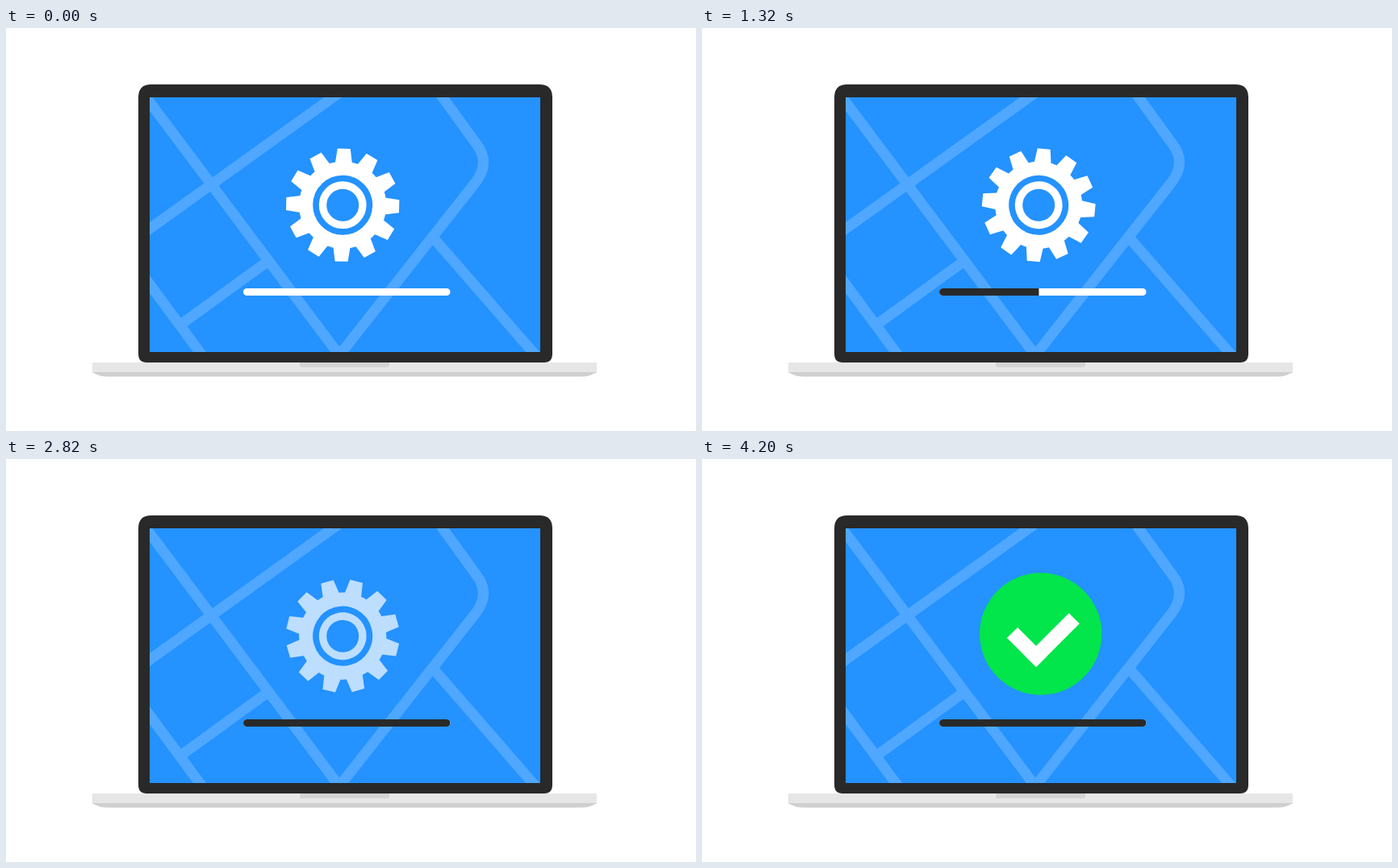
Animation of 855 by 500 pixels, one loop 4.35 s. Source, as an HTML page:

```html
<!DOCTYPE html>
<html lang="en">
<head>
<meta charset="utf-8">
<title>Laptop update</title>
<style>
  html, body { margin: 0; width: 100%; height: 100%; overflow: hidden; background: #fff; }
  svg { display: block; width: 855px; height: 500px; }
</style>
</head>
<body>
<svg viewBox="0 0 855 500">
  <defs>
    <clipPath id="screen"><rect x="178" y="86" width="484" height="316"/></clipPath>
    <clipPath id="track"><rect x="294" y="323" width="256.5" height="9" rx="4.5"/></clipPath>
    <path id="tooth" d="M-10.5-52 L-8-70 H8 L10.5-52Z"/>
  </defs>

  <path fill="#292929" d="M180 70H661Q677 70 677 86V404Q677 415 667 415H174Q164 415 164 404V86Q164 70 180 70Z"/>
  <g clip-path="url(#screen)">
    <rect x="178" y="86" width="484" height="316" fill="#2492ff"/>
    <g fill="none" stroke="#4fa7ff" stroke-width="13">
      <path d="M168 78.6L413 406"/>
      <path d="M168 256.2L415 78.8"/>
      <path d="M219 366L321 292"/>
      <path d="M168 304.5L250 415.6"/>
      <path d="M534 76.3L583 144Q600 166 583 190L413 406"/>
      <path d="M531 262L664 415"/>
    </g>
  </g>

  <path fill="#e6e6e6" d="M107 415H732V428H107Z"/>
  <path fill="#cfcfcf" d="M107 427H732Q724 432.5 712 432.5H127Q115 432.5 107 427Z"/>
  <path fill="#d4d4d4" d="M364 415H475V418Q475 421 472 421H367Q364 421 364 418Z"/>

  <g clip-path="url(#track)">
    <rect x="294" y="323" width="257" height="9" fill="#fff"/>
    <rect id="bar" x="294" y="323" width="0" height="9" fill="#292929"/>
  </g>

  <g id="gear">
    <g id="teeth" fill="#fff"></g>
    <g fill="none" stroke="#fff">
      <circle r="45.5" stroke-width="17"/>
      <circle r="24.7" stroke-width="9.4"/>
    </g>
  </g>

  <circle id="disc" cx="419.7" cy="217" r="0" fill="#02e54b"/>
  <g stroke="#fff" stroke-width="18.5">
    <line id="short" x1="384.5" y1="215.5"/>
    <line id="long" x1="407.5" y1="251.5"/>
  </g>
</svg>
<script>
  const LOOP = 4350, STEP = 30;
  const $ = id => document.getElementById(id);
  const [bar, gear, disc, short, long] = ['bar', 'gear', 'disc', 'short', 'long'].map($);

  for (let i = 0; i < 12; i++) {
    const tooth = document.createElementNS('http://www.w3.org/2000/svg', 'use');
    tooth.setAttribute('href', '#tooth');
    tooth.setAttribute('transform', `rotate(${i * 30})`);
    $('teeth').append(tooth);
  }

  const set = (el, attrs) => {
    for (const key in attrs) el.setAttribute(key, attrs[key]);
  };
  const ramp = (t, from, to) => Math.min(1, Math.max(0, (t - from) / (to - from)));
  const easeOut = p => 1 - (1 - p) ** 2;

  // Each stroke runs diagonally from its fixed start; dy is its direction.
  const grow = (line, p, size, dy) => set(line, {
    x2: +line.getAttribute('x1') + size * p,
    y2: +line.getAttribute('y1') + size * p * dy,
    visibility: p > 0 ? 'visible' : 'hidden'
  });

  function draw(t) {
    set(bar, { width: 256.5 * ramp(t, 125, 2608) });
    set(gear, {
      transform: `translate(417.2 219.7) rotate(${1.3 + t * 0.0258})`,
      opacity: 1 - ramp(t, 2730, 3030)
    });
    set(disc, { r: 75.7 * easeOut(ramp(t, 2820, 3030)) });
    grow(short, ramp(t, 3240, 3450), 36, 1);
    grow(long, ramp(t, 3480, 3750), 53.7, -1);
  }

  const start = performance.now();
  function tick() {
    const t = (performance.now() - start) % LOOP;
    draw(t - t % STEP);
    requestAnimationFrame(tick);
  }
  draw(0);
  requestAnimationFrame(tick);
</script>
</body>
</html>
```
